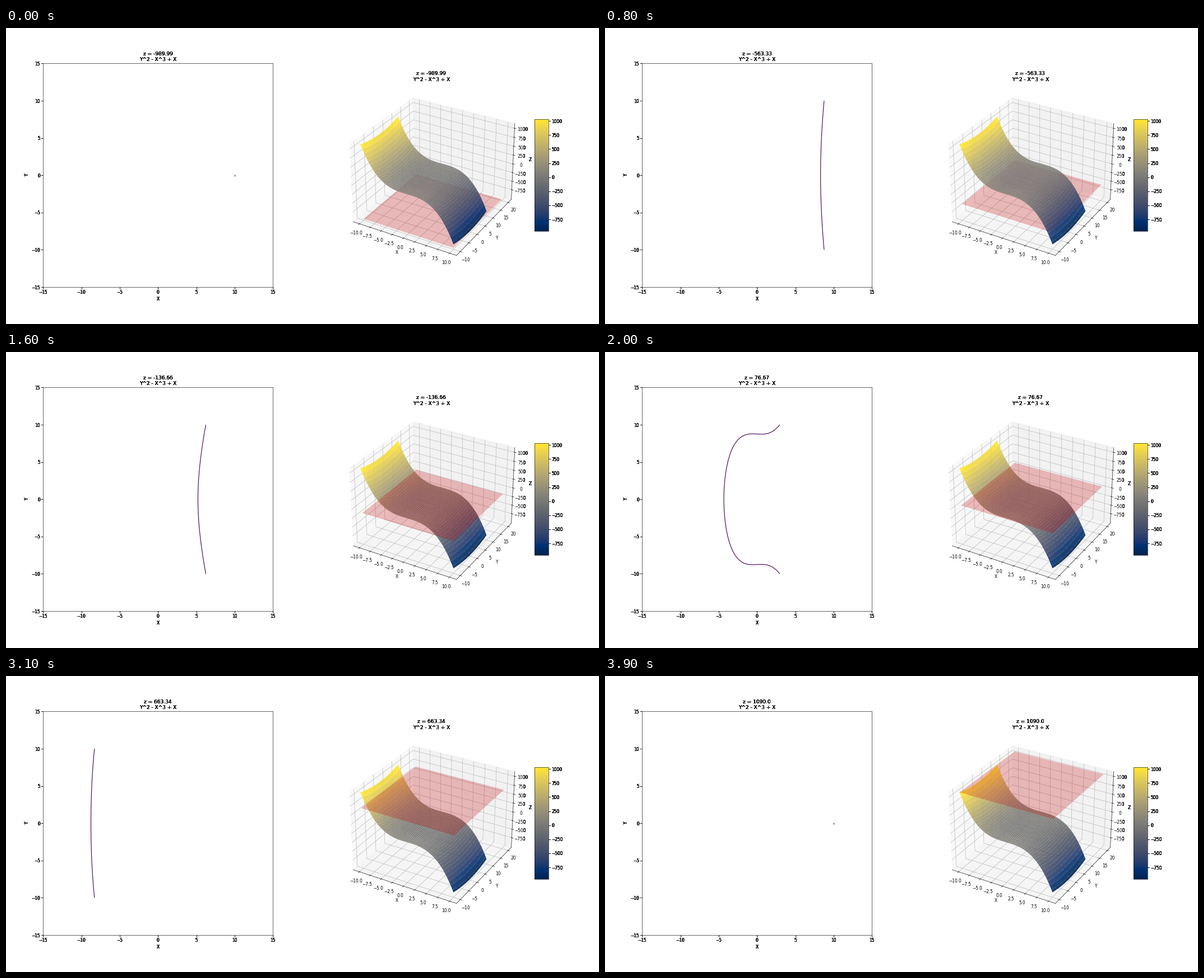
Write a matplotlib script that moves like this. It is 1058 px wide and 529 px high and loops after 4000 ms.

```python
import numpy as np
import matplotlib.pyplot as plt
from matplotlib.animation import FuncAnimation
from mpl_toolkits.mplot3d.art3d import Poly3DCollection

W, H, DPI = 1058, 529, 54
FRAMES, INTERVAL = 40, 100
STRIKES = 5  # labels outside the plot areas are overprinted this many times

plt.rcParams["font.family"] = "DejaVu Sans"
# The small surplus keeps the pixel size from being truncated downwards.
fig = plt.figure(figsize=((W + 0.01) / DPI, (H + 0.01) / DPI), dpi=DPI,
                 facecolor="white")

axis = np.linspace(-10, 10, 100)
X, Y = np.meshgrid(axis, axis)
Z = Y**2 - X**3 + X
levels = np.linspace(Z.min(), Z.max(), FRAMES)


def box(left, top, width, height):
    """Pixel box measured from the top left, as figure fractions."""
    return [left / W, 1 - (top + height) / H, width / W, height / H]


def flat_axes(full):
    ax = fig.add_axes(box(66.2, 63.4, 410, 399.6))
    ticks = np.arange(-15, 16, 5)
    ax.set(xlim=(-15, 15), ylim=(-15, 15), xticks=ticks, yticks=ticks,
           xlabel="X", ylabel="Y")
    ax.spines[:].set_visible(full)
    return ax


def space_axes(full):
    ax = fig.add_axes(box(594.7, 99.2, 328, 328), projection="3d")
    ax.set_zticks(np.arange(-750, 1001, 250))
    ax.set_zlabel("Z")
    if full:
        ax.set_xticks(np.arange(-10, 10.1, 2.5))
        ax.set_yticks(np.arange(-10, 21, 5))
        ax.set(xlabel="X", ylabel="Y")
    else:
        ax.set_xticks([])
        ax.set_yticks([])
    return ax


def fix_limits(ax):
    for set_lim, low, high, margin in (
        (ax.set_xlim, -10, 10, 0.05),
        (ax.set_ylim, -10, 20, 0.05),
        (ax.set_zlim, Z.min(), Z.max(), 0),
    ):
        span = high - low
        pad = span * margin + span * (1 + 2 * margin) / 48
        set_lim(low - pad, high + pad)


def add_title(ax):
    title = ax.set_title("", y=1)
    title.set_y(1)  # 3D axes lower the title on their own
    return title


on_top = [i == STRIKES - 1 for i in range(STRIKES)]
flats = [flat_axes(top) for top in on_top]
spaces = [space_axes(top) for top in on_top]
flat, space = flats[-1], spaces[-1]

surface = space.plot_surface(X, Y, Z, cmap="cividis")
plane = Poly3DCollection([np.zeros((4, 3))], facecolor=(0.767, 0, 0, 0.25),
                         linewidth=0)
space.add_collection3d(plane)
for ax in spaces:
    fix_limits(ax)

for top in on_top:
    cax = fig.add_axes(box(943.2, 163.2, 25, 200))
    bar = fig.colorbar(surface, cax=cax, ticks=np.arange(-750, 1001, 250))
    bar.outline.set_visible(top)

titles = [add_title(ax) for ax in flats + spaces]
contours = []


def update(frame):
    z = levels[frame]
    while contours:
        contours.pop().remove()
    # A level on the edge of the data range falls back to the minimum.
    level = z if Z.min() < z < Z.max() else Z.min()
    contours.append(flat.contour(X, Y, Z, [level], colors=["#440154"],
                                 linestyles="solid"))
    plane.set_verts([[(-10, -10, z), (10, -10, z), (10, 20, z), (-10, 20, z)]])
    for title in titles:
        title.set_text(f"z = {round(float(z), 2)}\nY^2 - X^3 + X")
    return []


anim = FuncAnimation(fig, update, frames=FRAMES, interval=INTERVAL,
                     repeat=True, repeat_delay=0, blit=False)
plt.show()
```
